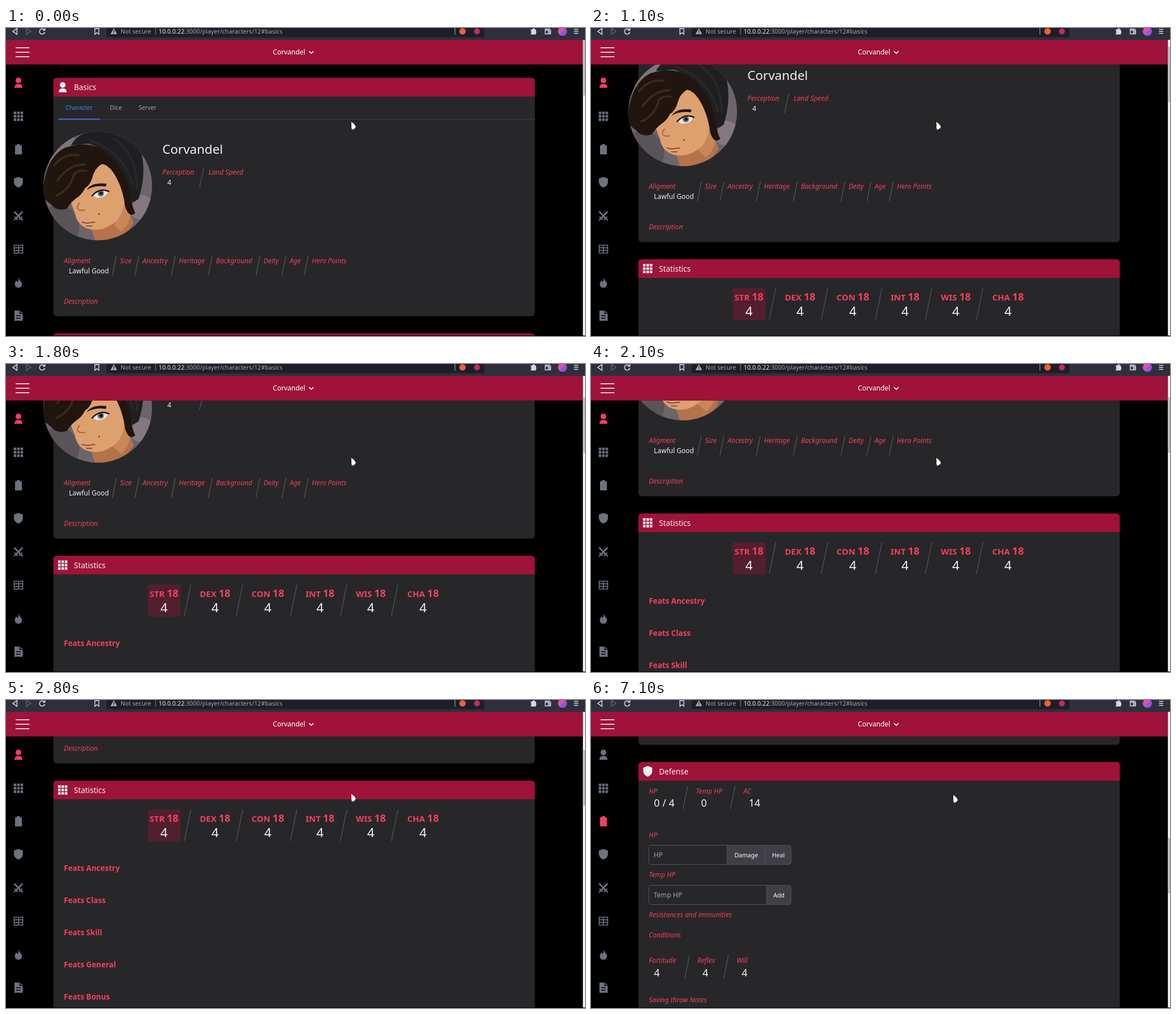
Animation of 1026x546 px, one loop 8000 ms. Source, as an HTML page:

```html
<!DOCTYPE html>
<html lang="en">
<head>
<meta charset="utf-8">
<title>Character sheet</title>
<style>
html, body { margin: 0; width: 100%; height: 100%; overflow: hidden; background: #000; }
svg { display: block; width: 1026px; height: 546px; font-family: "Noto Sans", sans-serif; }
</style>
</head>
<body>
<svg id="stage" viewBox="0 0 1026 546"></svg>
<script>
const ROSE = '#f43f5e', DEEP = '#9f1239', CARD = '#27272a', GREY = '#6b7280', WHITE = '#f1f1f3', LINE = '#52525b';
const HERO = 'Corvandel';

const text = (x, y, s, size = 12, fill = WHITE, more = '') =>
  `<text x="${x}" y="${y}" font-size="${size}" fill="${fill}" ${more}>${s}</text>`;
const label = (x, y, s) => text(x, y, s, 12, ROSE, 'font-style="italic"');
const bold = (x, y, s) => text(x, y, s, 13.5, ROSE, 'font-weight="700"');
const mid = (x, y, s, size, fill, more = '') => text(x, y, s, size, fill, 'text-anchor="middle" ' + more);
const rect = (x, y, w, h, fill, more = '') =>
  `<rect x="${x}" y="${y}" width="${w}" height="${h}" fill="${fill}" ${more}/>`;
const path = (d, fill = 'none', more = '') => `<path d="${d}" fill="${fill}" ${more}/>`;
const circle = (x, y, r, fill) => `<circle cx="${x}" cy="${y}" r="${r}" fill="${fill}"/>`;
const stroke = (d, color, w = 1.3) => path(d, 'none', `stroke="${color}" stroke-width="${w}"`);
const slash = (x, y, dx, h) => stroke(`M${x} ${y}l${-dx} ${h}`, LINE);
const at = (x, y, body, more = '') => `<g transform="translate(${x} ${y})" ${more}>${body}</g>`;

// Icons are centred on 0,0 and take the colour of their group.
const cells = (step, size) => [-1, 0, 1].map(r => [-1, 0, 1].map(c =>
  rect(c * step - size / 2, r * step - size / 2, size, size, 'currentColor')).join('')).join('');
const sword = stroke('M-7.5-7.5L5 5', 'currentColor', 2.8) + stroke('M1.5 7L7 1.5M4 4L8 8', 'currentColor', 2);
const icons = {
  person: circle(0, -4, 5, 'currentColor') + path('M-7 9Q-7 2 0 2Q7 2 7 9Z', 'currentColor'),
  grid: cells(6, 4.5),
  clipboard: path('M-6-7H-3V-9H3V-7H6V9H-6Z', 'currentColor'),
  shield: path('M0-9.5L8-6.5V0Q7 7 0 9.5Q-7 7-8 0V-6.5Z', 'currentColor'),
  swords: sword + `<g transform="scale(-1 1)">${sword}</g>`,
  table: path('M-7.5-7H7.5V7H-7.5ZM-7.5-2.3H7.5M-7.5 2.4H7.5M0-7V7', 'none', 'stroke="currentColor" stroke-width="1.7"'),
  flame: path('M0-9.5Q1-5 4-2Q7 1 6 5Q4 9.5 0 9.5Q-6 9-6.5 3Q-6-1-3.5-4Q-3-1-1-1Q1-5 0-9.5Z', 'currentColor'),
  page: path('M-7-9H3L7.5-4.5V9H-7Z', 'currentColor') + stroke('M-4 0H4M-4 4.5H4M2.5-8.5V-4H7', '#000', 1.5)
};
const icon = (name, x, y, color, id = '') => at(x, y, icons[name], `color="${color}" ${id && `id="${id}"`}`);

const card = (top, bottom, title, name) =>
  rect(84, top, 853, bottom - top, CARD, 'rx="6"') +
  (title ? path(`M84 ${top + 33}V${top + 6}q0-6 6-6H931q6 0 6 6V${top + 33}Z`, DEEP) +
    icon(name, 100.5, top + 16.5, WHITE) + text(120.5, top + 21.5, title, 13.5) : '');

const HAIR = '#20150f';
const portrait = `<clipPath id="round"><circle cx="162.5" cy="280" r="96.3"/></clipPath><g clip-path="url(#round)">` +
  rect(66, 183, 193, 194, '#6d656c') +
  circle(98, 215, 30, '#7d757c') + circle(240, 318, 22, '#85787f') + circle(92, 352, 38, '#5a5459') +
  path('M146 340L212 305L226 346Q208 378 158 378Z', '#b5734c') +
  path('M140 240Q185 225 204 270L214 312Q208 338 184 350Q168 361 146 356Q126 350 122 328L113 304Z', '#dda06f') +
  path('M190 348Q210 330 210 300L221 318Q222 345 204 361Z', '#c98757') +
  // curls on both sides of the forehead
  path('M64 300Q68 230 105 212Q150 196 190 226Q216 250 226 290Q219 308 229 328Q218 338 211 316Q207 282 190 256Q180 242 170 241' +
    'Q158 248 154 262Q150 278 140 284Q134 296 124 302Q114 310 108 320Q90 326 80 313Z', HAIR) +
  stroke('M84 245Q104 220 130 226M90 272Q112 240 141 242M88 298Q114 286 120 260Q128 250 144 254', '#3d281b', 4) +
  path('M115 208Q128 183 166 181Q220 186 240 222Q249 260 235 303L224 310Q219 272 200 244Q178 214 146 205Z', '#1f1f21') +
  stroke('M150 200Q210 220 225 280M190 195Q232 222 232 285', '#28282a', 4) +
  path('M143 287Q151 273 178 276L177 281Q157 278 143 287Z', HAIR) +
  path('M154 297Q166 283 181 291Q176 302 160 301Z', '#e8e4de') +
  circle(168, 293, 5.5, '#52717e') + circle(168.5, 293, 2.7, '#141414') +
  stroke('M152 298Q166 282 183 290', '#23150f', 2.5) +
  stroke('M131 310Q122 319 131 323L140 323', '#a76540', 1.8) +
  stroke('M134 344L143 346L158 344M142 351L153 351', '#713a29', 1.7) +
  circle(165, 330, 1.2, '#4b2a1c') + '</g>';

const basics = card(88.5, 511, 'Basics', 'person') +
  stroke('M93 162H937', '#374151', 1) + rect(93, 160.7, 73, 1.6, '#3b82f6') +
  text(105.5, 145, 'Character', 10.5, '#3b82f6') + text(184, 145, 'Dice', 10.5, '#9ca3af') +
  text(235, 145, 'Server', 10.5, '#9ca3af') +
  portrait + text(277, 223, HERO, 22.5) +
  label(277, 260, 'Perception') + text(286, 278, '4') + slash(350.5, 247.5, 7.5, 35) + label(359, 260, 'Land Speed') +
  [['Aligment', 102.5], ['Size', 202], ['Ancestry', 242], ['Heritage', 306.5], ['Background', 372],
   ['Deity', 456.5], ['Age', 502.5], ['Hero Points', 542]].map(([s, x]) =>
    label(x, 416.5, s) + (x > 110 ? slash(x - 6.5, 404, 7, 34.5) : '')).join('') +
  text(111.5, 434.5, 'Lawful Good') + label(102.5, 488.5, 'Description');

const stats = card(541.5, 1000, 'Statistics', 'grid') +
  rect(251, 592.5, 58, 57, DEEP, 'rx="3" opacity=".36"') +
  [['STR', 280], ['DEX', 370.5], ['CON', 464], ['INT', 556.5], ['WIS', 646.5], ['CHA', 739]].map(([s, x]) =>
    mid(x, 614.5, `${s} <tspan font-size="18">18</tspan>`, 15, ROSE, 'font-weight="700"') +
    mid(x, 641.5, '4', 22.5)).join('') +
  [327.5, 419.5, 515.5, 604, 694.5].map(x => slash(x, 592.5, 11.5, 56)).join('') +
  ['Ancestry', 'Class', 'Skill', 'General', 'Bonus'].map((s, i) =>
    bold(102.5, 701.5 + i * 57.1, 'Feats ' + s)).join('');

const coin = (n, unit) => `${n} <tspan fill="${GREY}">${unit}</tspan>`;
const field = (y, hint, cuts, names) =>
  rect(102.5, y, 252, 34, '#3f3f46', `rx="4" stroke="${LINE}"`) +
  path(`M${cuts[0]} ${y + .5}H106.5q-3.5 0-3.5 3.5v26q0 3.5 3.5 3.5H${cuts[0]}Z`, CARD) +
  text(111, y + 21.3, hint, 12, '#9ca3af') +
  cuts.map((x, i) => stroke(`M${x} ${y}v34`, LINE, 1) +
    mid((x + (cuts[i + 1] || 355)) / 2, y + 21, names[i], 10.5, '#fff', 'font-weight="500"')).join('');

const defense = card(0, 184) + bold(102.5, 106.5, 'Money') +
  [['PP', 232], ['GP', 279], ['SP', 328], ['CP', 374]].map(([s, x]) => text(x, 104.5, coin(0, s))).join('') +
  [269, 317, 363.5].map(x => slash(x, 92, 4.5, 17)).join('') +
  label(232, 140.5, 'Total') + text(240.5, 161, coin(0, 'GP'), 15) +
  card(214.5, 700, 'Defense', 'shield') +
  [['HP', 102.5, '0 / 4', 111.5], ['Temp HP', 186, '0', 195], ['AC', 270, '14', 279.5]].map(([s, x, n, nx]) =>
    label(x, 270, s) + text(nx, 293.3, n, 18)).join('') +
  slash(171.5, 257, 8.5, 41) + slash(255.5, 257, 8.5, 41) +
  label(102.5, 348, 'HP') + field(362, 'HP', [241, 309], ['Damage', 'Heal']) +
  label(102.5, 418.5, 'Temp HP') + field(433, 'Temp HP', [311], ['Add']) +
  label(102.5, 489.5, 'Resistances and immunities') + label(102.5, 525.5, 'Conditions') +
  [['Fortitude', 102.5, 111.5], ['Reflex', 188.5, 197.5], ['Will', 258, 267]].map(([s, x, nx]) =>
    label(x, 570.5, s) + text(nx, 594, '4', 18)).join('') +
  slash(174.5, 557.5, 8.5, 41) + slash(243.5, 557.5, 8.5, 41) + label(102.5, 640, 'Saving throw Notes');

const PALE = '#d5d8df';
const toolbar = rect(0, 0, 1026, 21, '#2d303c') + path('M178 0H848V13q0 3.5-3.5 3.5H181.5q-3.5 0-3.5-3.5Z', '#1d1f28') +
  stroke('M19.5 .8V11.2L12 6Z', PALE, 1.5) + stroke('M36.5 .8V11.2L44 6Z', '#60646f', 1.4) +
  stroke('M67.5 3A4.7 4.7 0 1 0 68.7 7M68.8 .5V4H65', PALE, 1.6) +
  stroke('M157.5 1H164.5V11.2L161 8.2L157.5 11.2Z', PALE, 1.4) +
  path('M191 .5L197 11H185Z', '#a4a7af') + rect(190.4, 4, 1.3, 3.3, '#1d1f28') + rect(190.4, 8.3, 1.3, 1.3, '#1d1f28') +
  text(203, 10, 'Not secure', 10.6, '#a4a7af') + rect(264.5, 0, 1, 12, '#80838c') +
  text(270.5, 10, '<tspan fill="#f0f0f2">10.0.0.22</tspan>:3000/player/characters/12#basics', 10.75, '#a4a7af') +
  rect(795, 0, 1, 12, '#a4a7af') + circle(809, 6, 5.7, '#f4602e') + circle(834.5, 6, 5.3, '#c52a5e') +
  path('M930 2.5H933A2 2 0 0 1 937 2.5H939V5.5A2 2 0 0 1 939 9V11.5H930V8.8A1.8 1.8 0 0 0 930 5.5Z', PALE) +
  stroke('M964.5 2H955.5V10.5H965V4H955.5M965 6H961V8.5H965', PALE, 1.4) +
  `<linearGradient id="tint" x2="1" y2="1"><stop offset=".4" stop-color="#e64fa5"/><stop offset=".6" stop-color="#8d55df"/></linearGradient>` +
  circle(986, 6, 8, 'url(#tint)') + stroke('M1006.5 2.5H1014M1006.5 6H1014M1006.5 9.5H1014', PALE, 1.3);

const navbar = rect(0, 21, 1022, 43.7, DEEP) + stroke('M17 35H41.5M17 43H41.5M17 51H41.5', '#fff', 1.5) +
  mid(501.5, 47, HERO, 12, '#fff') + stroke('M537 41L541 45L545 41', '#fff', 1.6);

const side = [['person', 97], ['grid', 156.5], ['clipboard', 215], ['shield', 273.5],
  ['swords', 333], ['table', 392], ['flame', 451], ['page', 510]];

const stage = document.getElementById('stage');
stage.innerHTML = rect(0, 0, 1026, 546, '#000') +
  '<clipPath id="view"><rect y="64.7" width="1022" height="480.3"/></clipPath>' +
  `<g clip-path="url(#view)"><g id="page">${basics + stats + at(0, 1065, defense)}</g></g>` +
  side.map(([name, y]) => icon(name, 22, y, GREY, 'side-' + name)).join('') + navbar +
  rect(1022.3, 21, 3.7, 524, '#f5f5f5') + rect(1022.3, 0, 3.7, 98.5, '#bcbcbc', 'id="thumb"') + toolbar +
  path('M.3 0L5 3.5L8.3 8.5L6 12L1.5 14L.5 10Z', '#fff', 'id="pointer"');

const scrollKeys = [[0, 0], [500, 0], [600, 25], [700, 63], [800, 63], [900, 76], [1100, 131.5], [1400, 198],
  [1700, 198], [1800, 201.5], [2100, 276.5], [2600, 372], [2800, 398.5], [6500, 398.5], [6600, 1065],
  [7000, 1065], [7100, 1169.5], [8000, 1169.5]];
const thumbKeys = [[0, 21], [700, 33], [1200, 46], [1400, 59], [2600, 89], [6600, 224.5], [7100, 244.5]];

function lerp(keys, t) {
  const i = keys.findIndex(k => k[0] > t);
  const [t0, a] = keys[i - 1], [t1, b] = keys[i];
  return a + (b - a) * (t - t0) / (t1 - t0);
}
const hold = (keys, t) => keys.filter(k => k[0] <= t).pop()[1];
const $ = id => document.getElementById(id);
const page = $('page'), thumb = $('thumb'), pointer = $('pointer'), person = $('side-person'), clipboard = $('side-clipboard');

function draw(ms) {
  const t = Math.floor(ms % 8000 / 100) * 100; // the screen refreshes ten times a second
  page.setAttribute('transform', `translate(0 ${-lerp(scrollKeys, t)})`);
  thumb.setAttribute('y', hold(thumbKeys, t));
  pointer.setAttribute('transform', t < 7100 ? 'translate(611.7 166.5)' : 'translate(641.7 168.5)');
  person.setAttribute('color', t < 6600 ? ROSE : GREY);
  clipboard.setAttribute('color', t < 6600 ? GREY : ROSE);
}

let start;
function tick(now) {
  start ??= now;
  draw(now - start);
  requestAnimationFrame(tick);
}
draw(0);
requestAnimationFrame(tick);
</script>
</body>
</html>
```
